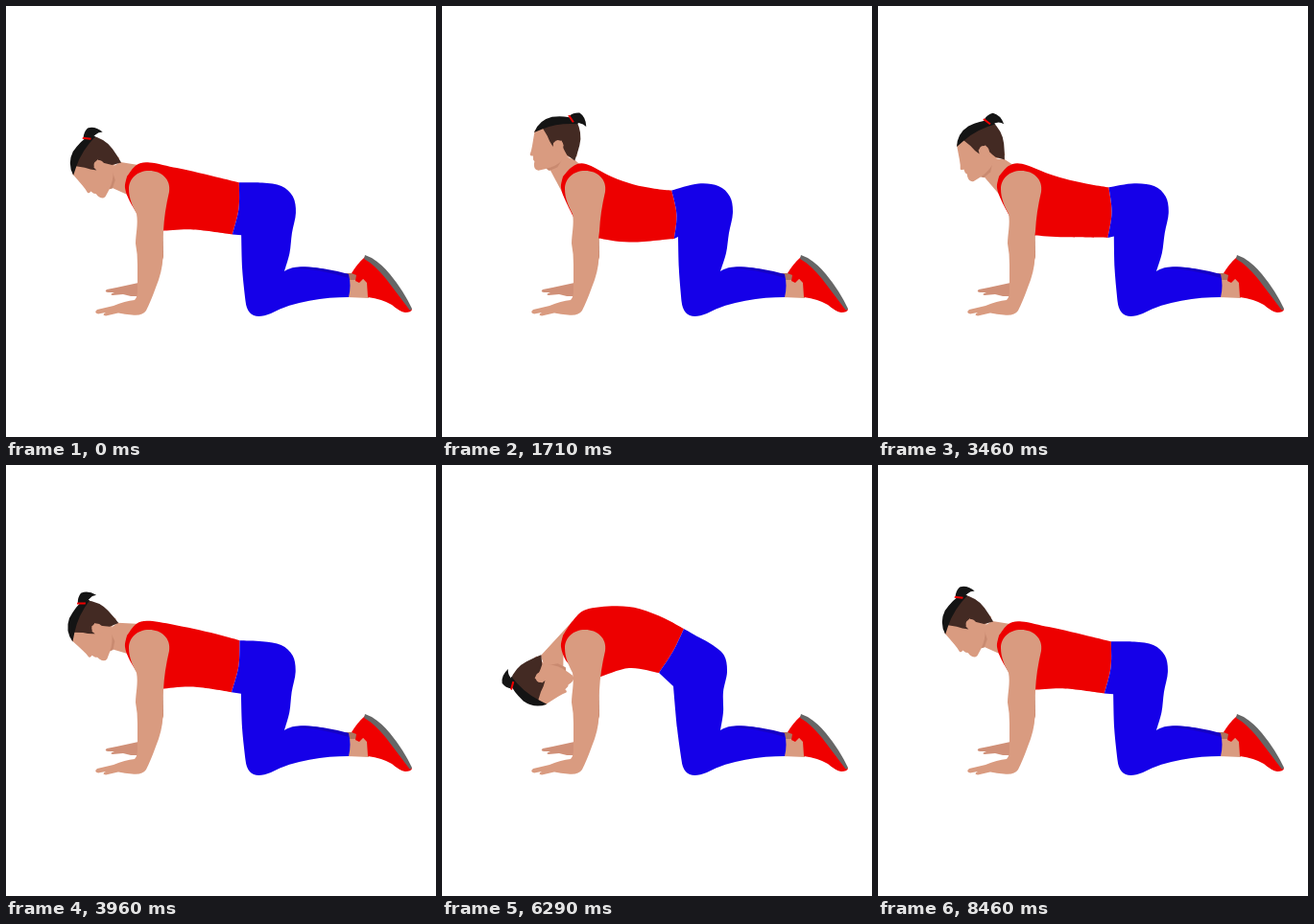
Animation, 448 px wide and 450 px high, one loop 8.5 s. Source, as an HTML page:

```html
<!DOCTYPE html>
<html lang="en">
<head>
<meta charset="utf-8">
<title>Cat cow stretch</title>
<style>
html, body { margin: 0; width: 100%; height: 100%; overflow: hidden; background: #fff; }
svg { display: block; width: 100vw; height: 100vh; }
.skin { fill: #d99b80; }
.far { fill: #d09078; }
.shade { fill: #c98a70; }
.red { fill: #f00000; }
.black { fill: #141414; }
.brown { fill: #432a23; }
#shirt { fill: #ed0000; }
#pants { fill: #1500e8; }
</style>
</head>
<body>
<svg viewBox="0 0 448 450">
  <path class="far" d="M138 289L115 294L105 296Q102 298 106 299L113 299Q107 301 111 302L122 301L130 303H138Z"/>
  <path class="shade" d="M150 225H163.500L164 262L158 280Z"/>
  <path class="skin" d="M355 284L366 280L378 290V305L355 304Z"/>
  <path fill="#ad755f" d="M354 279L364 279L368 286L356 286Z"/>
  <path class="red" d="M374 262Q366 269 360 279L365 281L364 287L368 289L372 285L376 289L377 304Q392 306 402 312Q410 319 416 320Q422 320 423 317L397 282Z"/>
  <path fill="#666" d="M374 260L381 263Q392 270 400 280Q414 297 423 316L421 318L396 285Q384 270 373 264Z"/>
  <path id="neck" class="skin"/>
  <g id="head">
    <path class="shade" d="M109 165L128 158L121 166L112 168Z"/>
    <path class="skin" d="M104 124Q101 133 99 139Q97 145 95 148Q95 150 98 150L97.500 154L98.500 156L97.500 159Q96.500 165 101 166Q108 166 114 165Q124 163 131 157L143 158L146 126L120 119Z"/>
    <path class="brown" d="M112 122L148 120Q153 135 147.500 147Q144 155 140 162L133 155Q131 150 130 146L130 139L121 140L120 144Q117 138 116 132Z"/>
    <path class="black" d="M103 126Q110 114 124 113Q139 114 147 119L150 125Q130 120 112 124Z"/>
    <path class="black" d="M142 115Q147 112 153 113.500Q159 119 157.500 129Q155 125 151 124L145 122Z"/>
    <path class="red" d="M140.500 114.500L142.500 114L146 122L144 122.500Z"/>
    <path class="skin" d="M121 144Q121 138 126 138Q131 139 131 144Q130 150 126 151Q123 150 121 144Z"/>
  </g>
  <path id="shirt"/>
  <path id="pants"/>
  <path fill="#1500c4" d="M296 274Q318 269 357 280V284Q322 273 296 274Z"/>
  <path class="skin" d="M149 172C137 172 128 180 128 191C128 201 132 209 136 217C138 228 135 238 135 248Q137 258 137 270V297Q137 304 134 307Q124 308 112 313L95 317Q91 320 96 321.500L104 320Q99 323 104 323.500L117 320.500Q124 322 131 322.500Q142 324 146 318Q151 308 156 294Q163 277 163.500 262Q162 248 164 235Q165 215 170 194C172 181 162 172 149 172Z"/>
</svg>
<script>
const $ = id => document.getElementById(id);
const LOOP = 8500;

// Flex of the spine: 0 is arched down, 1 is rounded up
const ARCHED = 0, LEVEL = 0.42, ROUND = 1;
const moves = [
  { from: 220, to: 2380, a: LEVEL, b: ARCHED },
  { from: 2760, to: 5670, a: ARCHED, b: ROUND },
  { from: 6260, to: 8460, a: ROUND, b: LEVEL }
];

function flexAt(t) {
  const m = moves.filter(v => t >= v.from).pop();
  if (!m) return LEVEL;
  let u = Math.min(1, (t - m.from) / (m.to - m.from));
  u += 0.28 * u * (1 - u);
  return m.a + (m.b - m.a) * u * u * (3 - 2 * u);
}

const fmt = p => p[0].toFixed(2) + ' ' + p[1].toFixed(2);
const mix = (a, b, u) => a.map((v, k) => v + (b[k] - v) * u);
const join = (...parts) => 'M' + parts.join('L') + 'Z';

// Smooth curve through points
function curve(...pts) {
  let d = fmt(pts[0]);
  for (let i = 0; i < pts.length - 1; i++) {
    const a = pts[i], b = pts[i + 1], o = pts[i - 1] || a, n = pts[i + 2] || b;
    const c1 = a.map((v, k) => v + (b[k] - o[k]) / 6);
    const c2 = b.map((v, k) => v - (n[k] - a[k]) / 6);
    d += 'C' + [c1, c2, b].map(fmt).join(' ');
  }
  return d;
}

const lowerLeg = 'C300 270 318 272 330 274.5Q345 279 357 280Q360 292 357 304'
  + 'C332 304 300 308 276 321Q252 331 249.5 308';

function draw(t) {
  const f = flexAt(t), f2 = f * f;

  // Torso
  const collar = [126, 178], throat = [126.5, 197];
  const neckBack = [136, 168 - 5 * f];
  const nape = [150, 165 - 14 * f ** 2.5];
  const waist = [239 + 13 * f ** 1.4, 194 - 23 * f];
  const hemEnd = [243 - 17 * f, 243 - 26 * f2];
  const sag = 7.5 - 19.5 * f;
  const spine = [0.3, 0.55, 0.8].map(u => {
    const p = mix(nape, waist, u);
    return [p[0], p[1] + sag * Math.sin(Math.PI * u)];
  });
  const mid = mix(waist, hemEnd, 0.5);
  const hem = [waist, [mid[0] + 4 - 2 * f, mid[1]], hemEnd];
  $('shirt').setAttribute('d', join(
    curve(collar, neckBack, nape, ...spine, waist),
    curve(...hem),
    curve(hemEnd, [195, 249 - 37 * f], [163, 244 - 22 * f]),
    curve([137, 221 - 9 * f], [129, 204], [124, 190], collar)));

  // Hips slide forward as the back rounds
  const slide = (x, y) => [x - 6 * f2, y];
  $('pants').setAttribute('d', join(
    curve(waist, [267, 185.5 - 6 * f2], slide(288, 188), slide(300, 199),
      slide(303, 216), slide(299, 237), [296 - 3 * f2, 258], [290, 277]) + lowerLeg,
    curve([249.5, 308], [247 - 2 * f, 275], [246 - 5 * f2, 241 - 10 * f2]),
    curve(...hem.reverse())));

  // Head swings on an arc around the shoulder and nods as it goes
  const swing = (255.4 - 117 * f ** 1.1) * Math.PI / 180;
  const ear = [138 + 47 * Math.cos(swing), 190 + 47 * Math.sin(swing)];
  const nod = -141 * f, r = nod * Math.PI / 180;
  const onHead = (x, y) => [
    ear[0] + x * Math.cos(r) - y * Math.sin(r),
    ear[1] + x * Math.sin(r) + y * Math.cos(r)
  ];
  $('head').setAttribute('transform',
    `translate(${fmt(ear)}) rotate(${nod.toFixed(2)}) translate(-126 -144)`);
  $('neck').setAttribute('d', join(...[
    onHead(14, 17), mix(nape, neckBack, Math.min(1, 0.3 + 1.6 * f)), [145, 190],
    throat, onHead(-14, 20), onHead(-2, 8)
  ].map(fmt)));
}

const start = performance.now();
function tick() {
  draw((performance.now() - start) % LOOP);
  requestAnimationFrame(tick);
}
tick();
</script>
</body>
</html>
```
